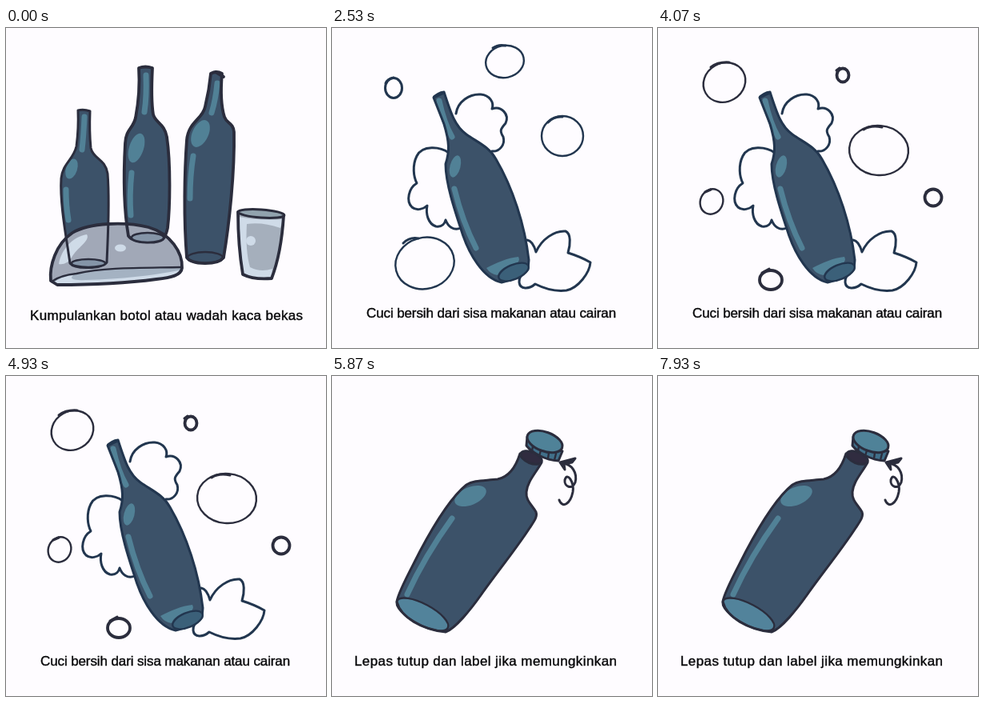
Write an HTML page that moves like this. It is 400x400 px and loops after 8000 ms.

```html
<!DOCTYPE html>
<html lang="id">
<head>
<meta charset="utf-8">
<title>Botol kaca bekas</title>
<style>
  html, body { margin: 0; width: 100%; height: 100%; overflow: hidden; background: #fefcff; }
  svg { display: block; width: 100%; height: 100%; }
  g[id] { display: none; }
  path, ellipse { stroke-linecap: round; stroke-linejoin: round; }
  .line { fill: none; stroke: #2b2d3d; stroke-width: 3; }
  .thin { stroke-width: 2.4; }
  .bold { stroke-width: 3.8; }
  .navy { stroke: #22364f; }
  .glass { fill: #3c5269; }
  .shine { fill: #518196; }
  .streak { fill: none; stroke: #518196; stroke-width: 7; }
  .pale { fill: #cfdbe8; }
  text { font: 17px "Liberation Sans", Arial, sans-serif; fill: #08080a; stroke: #08080a; stroke-width: .4; }
</style>
</head>
<body>
<svg viewBox="0 0 400 400">
  <defs>
    <path id="bottleLeft" d="M90 103Q97 101 105 104Q104 130 106 150C109 164 124 163 127 182C130 220 127 265 126 293C120 301 86 302 80 294C76 265 67 220 69 188C71 169 84 165 88 148Q91 125 90 103Z"/>
    <path id="bottleMid" d="M166 50Q174 47 183 50Q181 90 184 108C187 119 198 119 201 136C206 170 205 225 202 250Q200 260 196 264C190 269 160 270 153 260C147 225 147 180 149 144C150 126 159 126 162 112Q168 80 166 50Z"/>
    <path id="bottleRight" d="M256 57Q263 53 270 57Q267 92 273 111C276 120 284 118 285 130C286 180 279 245 272 287C264 297 232 296 226 287C222 240 223 180 226 140C228 117 246 114 249 98Q254 78 256 57Z"/>
    <path id="plate" d="M56 316C54 298 62 270 83 256C104 243 150 242 178 249C206 257 221 281 220 300C219 309 207 312 188 314C150 319 105 321 64 321Z"/>
    <path id="rim" d="M57 317Q68 309 88 307C125 299 165 300 219 299"/>
    <path id="tumbler" d="M290 230Q290 272 296 308Q310 315 332 313Q344 282 347 235"/>
    <path id="bottleTilted" d="M127 87Q132 81 140 80C149 108 154 123 168 133C182 143 196 148 205 164C226 200 241 246 246 290L245 302Q232 314 212 318C188 313 171 280 164 260C154 230 142 195 142 170C147 155 147 143 140 120Z"/>
    <path id="bottleOpen" d="M235 97C230 113 222 126 207 129C190 131 177 130 168 136C148 152 127 187 110 219C98 243 83 269 81 282C86 302 113 317 142 320C154 316 174 291 186 274C205 247 231 215 247 190C253 181 257 176 255 170C250 161 242 156 243 145C244 132 255 121 262 108"/>
  </defs>

  <g id="collect">
    <use href="#bottleLeft" class="glass"/>
    <path class="streak" d="M98 111Q97 135 95 152"/>
    <ellipse class="shine" cx="82" cy="176" rx="7" ry="13" transform="rotate(18 82 176)"/>
    <path class="streak" d="M75 202Q75 222 78 240"/>

    <use href="#bottleMid" class="glass"/>
    <path class="streak" d="M175 59Q176 85 173 105"/>
    <ellipse class="shine" cx="163" cy="150" rx="9" ry="19" transform="rotate(18 163 150)"/>
    <path class="streak" d="M157 181Q154 210 156 234"/>

    <use href="#bottleRight" class="glass"/>
    <path class="streak" d="M264 69Q262 90 257 106"/>
    <ellipse class="shine" cx="243" cy="132" rx="10" ry="18" transform="rotate(25 243 132)"/>
    <path class="streak" d="M234 160Q230 185 230 213"/>
    <use href="#bottleRight" class="line bold"/>
    <path class="line bold" d="M262 55L272 61"/>
    <ellipse class="line thin" cx="249" cy="287" rx="22" ry="7"/>

    <use href="#plate" fill="#a1a8b7"/>
    <path fill="#a4b2c2" d="M57 317Q68 309 88 307C125 299 165 300 219 299Q219 308 207 311Q135 320 64 320Z"/>
    <path class="pale" d="M60 318Q68 311 84 309Q76 316 100 315Q165 313 216 303Q217 309 207 311Q135 320 64 320Z"/>
    <path class="pale" d="M66 295C69 277 83 261 101 258C106 266 88 275 82 287Q75 297 66 295Z"/>
    <ellipse class="pale" cx="143" cy="275" rx="7" ry="4.5"/>
    <use href="#bottleLeft" class="line"/>
    <use href="#bottleMid" class="line bold"/>
    <ellipse class="line thin" cx="103" cy="294" rx="21" ry="5" style="fill:#8595a8"/>
    <ellipse class="line thin" cx="177" cy="262" rx="20" ry="6" style="fill:#8595a8"/>
    <use href="#plate" class="line bold"/>
    <use href="#rim" class="line thin"/>

    <use href="#tumbler" fill="#a5afbc"/>
    <path class="pale" d="M291 236Q315 241 346 239L343 250Q320 242 301 245Q299 278 305 299Q318 306 333 301L331 312Q308 314 297 306Q291 275 291 236Z"/>
    <ellipse class="pale" cx="306" cy="266" rx="6" ry="6"/>
    <use href="#tumbler" class="line bold"/>
    <ellipse class="line" cx="319" cy="232" rx="29" ry="5" transform="rotate(4 319 232)" style="fill:#91a3ae"/>
    <text x="30" y="365" letter-spacing=".32">Kumpulankan botol atau wadah kaca bekas</text>
  </g>

  <g id="wash">
    <g class="line navy">
      <path d="M155 107C157 92 172 82 186 83C197 84 203 93 200 101C212 97 222 108 217 119C211 126 209 128 214 136C217 146 209 155 200 154"/>
      <path d="M146 156C135 148 113 146 106 160C100 172 102 186 106 194C96 200 92 216 100 224C106 229 115 226 119 222C117 232 120 245 130 248C138 249 141 244 142 240C145 248 152 254 161 250"/>
      <path d="M244 265Q251 266 255 280C262 264 278 253 292 254C299 257 298 271 295 281Q311 286 323 293C322 306 308 325 293 328C278 330 264 325 254 320C246 327 235 327 234 318Q233 310 243 304"/>
    </g>
    <use href="#bottleTilted" class="glass"/>
    <path class="streak" d="M134 91Q140 119 150 136"/>
    <ellipse class="shine" cx="154" cy="173" rx="6.5" ry="14" transform="rotate(15 154 173)"/>
    <path class="streak" d="M153 201Q163 242 180 275"/>
    <path class="shine" d="M193 300C204 294 220 287 233 286Q236 292 229 295Q211 298 207 309Q198 308 193 300Z"/>
    <use href="#bottleTilted" class="line navy"/>
    <ellipse class="line thin navy" cx="227" cy="305" rx="20" ry="9" transform="rotate(-23 227 305)" style="fill:#3b6079"/>
    <path class="line bold navy" d="M128 86L139 81"/>

    <g id="bubblesA">
      <g class="line thin navy">
        <ellipse cx="216" cy="42" rx="24" ry="20" transform="rotate(-12 216 42)"/>
        <ellipse cx="288" cy="135" rx="26" ry="25"/>
        <ellipse cx="116" cy="294" rx="37" ry="32" transform="rotate(-15 116 294)"/>
      </g>
      <ellipse class="line navy" cx="77" cy="75" rx="10.5" ry="12.5"/>
      <path class="line navy" d="M201 25Q208 20 217 22M67 69Q69 64 77 62M270 118Q277 110 288 111M89 269Q97 261 108 263"/>
    </g>
    <g id="bubblesB">
      <g class="line thin">
        <ellipse cx="83" cy="68" rx="27" ry="24" transform="rotate(-30 83 68)"/>
        <ellipse cx="276" cy="153" rx="37" ry="31" transform="rotate(5 276 153)"/>
        <ellipse cx="67" cy="217" rx="14" ry="16" transform="rotate(25 67 217)"/>
      </g>
      <g class="line bold">
        <ellipse cx="231" cy="59" rx="7.5" ry="8.5"/>
        <ellipse cx="344" cy="212" rx="10.5" ry="10.5"/>
        <ellipse cx="141" cy="315" rx="14" ry="12"/>
      </g>
      <path class="line" d="M66 49Q75 42 89 43M257 127Q266 121 280 124M59 205L66 202M223 53L227 50M335 205L340 202M130 306L139 301"/>
    </g>
    <text x="43" y="362" letter-spacing="-.11">Cuci bersih dari sisa makanan atau cairan</text>
  </g>

  <g id="uncap">
    <use href="#bottleOpen" class="glass"/>
    <ellipse class="shine" cx="173" cy="150" rx="21" ry="11" transform="rotate(-23 173 150)"/>
    <path class="streak" d="M150 178Q116 225 94 273"/>
    <ellipse class="line thin" cx="113" cy="298" rx="36" ry="13" transform="rotate(28 113 298)" style="fill:#52839b"/>
    <use href="#bottleOpen" class="line"/>
    <ellipse class="line" cx="249" cy="102" rx="14" ry="7" transform="rotate(22 249 102)" style="fill:#302c40"/>
    <path class="line" style="fill:#41708a" d="M244 76L243 87C250 96 266 105 283 106L288 94Z"/>
    <ellipse class="line" cx="266" cy="82" rx="23" ry="12" transform="rotate(20 266 82)" style="fill:#4f8298"/>
    <path class="line thin" d="M251 88L250 94M261 93L259 100M271 96L270 103M280 97L278 105"/>
    <path class="line" d="M288 109C300 110 307 121 304 133C300 143 290 138 291 130C294 119 303 133 301 145C298 160 288 166 284 155"/>
    <path class="line" style="fill:#2b2d3d" d="M304 103L285 108L291 117L290 110L300 108Z"/>
    <text x="28" y="362" letter-spacing=".4">Lepas tutup dan label jika memungkinkan</text>
  </g>
</svg>
<script>
  const LOOP = 8000, WASH = 2530, UNCAP = 5870;
  const bubbleSwaps = [2600, 2870, 3270, 3670, 4070, 4530, 4930, 5400];
  const show = (id, on) => {
    document.getElementById(id).style.display = on ? "inline" : "none";
  };

  function draw(now) {
    const t = now % LOOP;
    const swapped = bubbleSwaps.filter(time => t >= time).length % 2 === 1;
    show("collect", t < WASH);
    show("wash", t >= WASH && t < UNCAP);
    show("uncap", t >= UNCAP);
    show("bubblesA", !swapped);
    show("bubblesB", swapped);
  }

  const start = performance.now();
  function tick() {
    draw(performance.now() - start);
    requestAnimationFrame(tick);
  }
  tick();
</script>
</body>
</html>
```
